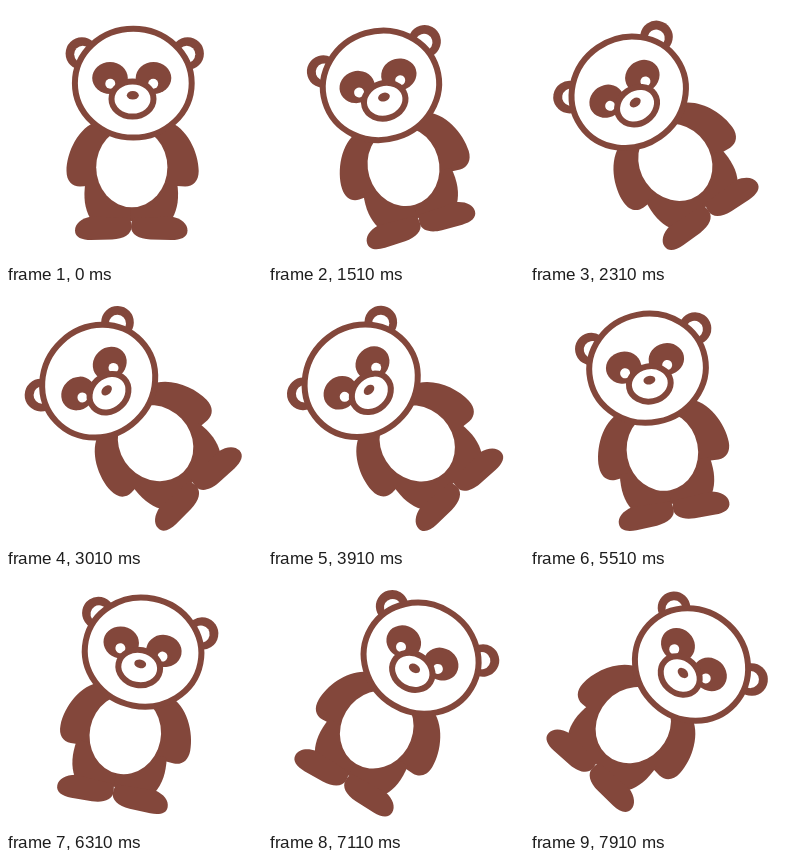
Write an HTML page that moves like this. It is 256 px wide and 256 px high and loops after 8000 ms.

```html
<!DOCTYPE html>
<html lang="en">
<head>
<meta charset="utf-8">
<title>Swaying panda</title>
<style>
  html, body { margin: 0; width: 100%; height: 100%; overflow: hidden; background: #fff; }
  svg { display: block; width: 100%; height: 100%; }
  .brown { fill: #83473b; }
  .white { fill: #fff; }
  .ring { fill: #fff; stroke: #83473b; stroke-width: 6; }
</style>
</head>
<body>
<svg viewBox="0 0 256 256">
  <defs>
    <path id="arm" class="brown" d="M128 110 L92 115 C72 121 60.5 147 60.5 165 C60.5 175 66 180.5 74 180.5 L82 180 L128 190 Z"/>
    <g id="leg" class="brown">
      <path d="M79.5 176 C77 192 79 203 84 212 L125.5 215 L128 176 Z"/>
      <path d="M85 210.5 C75 212.5 69 218 69 224.5 C69 231.5 76 234 85 234 L106 233.5 C118 233 125.5 228 125.5 221 C125.5 218 125 216 124 212 Z"/>
    </g>
    <g id="ear">
      <circle class="brown" cx="75.9" cy="47.5" r="16.3"/>
      <circle class="white" cx="76.8" cy="48.3" r="8.6"/>
    </g>
    <g id="eye">
      <ellipse class="brown" cx="104" cy="72" rx="17.8" ry="16"/>
      <circle class="white" cx="104.3" cy="77.8" r="5"/>
    </g>
  </defs>
  <g id="panda">
    <use href="#arm"/>
    <use href="#arm" transform="matrix(-1 0 0 1 253.2 0)"/>
    <use href="#leg"/>
    <use href="#leg" transform="matrix(-1 0 0 1 250.5 0)"/>
    <ellipse class="white" cx="125.8" cy="161.3" rx="35.6" ry="40"/>
    <use href="#ear"/>
    <use href="#ear" transform="matrix(-1 0 0 1 257.5 0)"/>
    <ellipse class="ring" cx="127.3" cy="77.2" rx="58.4" ry="54.4"/>
    <use href="#eye"/>
    <use href="#eye" transform="matrix(-1 0 0 1 251.5 0)"/>
    <ellipse class="ring" cx="126.5" cy="93" rx="21" ry="17.6"/>
    <ellipse class="brown" cx="126.8" cy="89.3" rx="6" ry="4.3"/>
  </g>
</svg>
<script>
  const LOOP = 8000, HOLD = 1010, STEP = 100;
  const SWING = 45, STEPS_PER_CYCLE = 100;
  const panda = document.getElementById('panda');

  // Upright during the hold, then a sine sway advanced in discrete steps.
  function draw(now) {
    const time = now % LOOP;
    const step = time < HOLD ? 0 : 1 + Math.floor((time - HOLD) / STEP);
    const angle = -SWING * Math.sin(2 * Math.PI * step / STEPS_PER_CYCLE);
    panda.setAttribute('transform', `rotate(${angle} 127.5 127.5)`);
  }

  const start = performance.now();
  function tick() {
    draw(performance.now() - start);
    requestAnimationFrame(tick);
  }
  tick();
</script>
</body>
</html>
```
